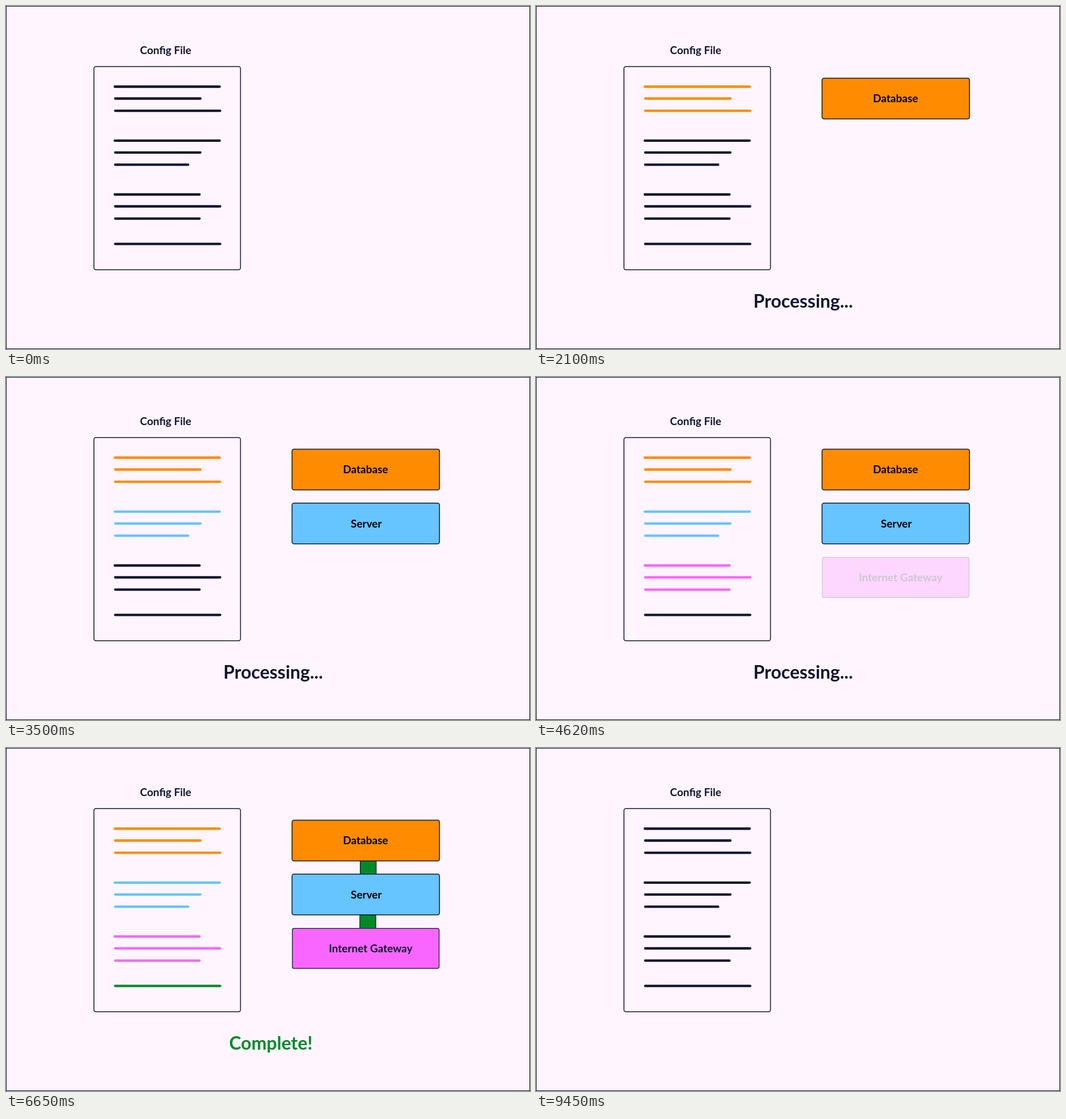
Recreate the animation shown at these times as an HTML page. Size 924 by 606 pixels, loop 9.8 s.

```html
<!DOCTYPE html>
<html lang="en">
<head>
<meta charset="utf-8">
<title>Config file processing</title>
<style>
  html, body { margin: 0; width: 100%; height: 100%; overflow: hidden; background: #fff5ff; }
  svg { display: block; width: 924px; height: 606px; }
  text { font: 700 19px Lato, "Open Sans", sans-serif; text-anchor: middle; fill: #10162f; }
  .status { font-size: 32px; }
  .lines { fill: none; stroke-width: 4.3; stroke-linecap: round; }
  rect { stroke: #10162f; stroke-width: 1.5; }
</style>
</head>
<body>
<svg viewBox="0 0 924 606">
  <rect x=".5" y=".5" width="923" height="605" fill="#fff5ff" style="stroke-width:1"/>
  <text x="281.5" y="85">Config File</text>
  <rect x="155.1" y="106.9" width="258.4" height="359.2" rx="3.5" fill="none"/>

  <path class="lines" data-start="1120" data-color="#ff8c00" d="M191.8 142.5H376.8M192.6 163.5H342.8M192.6 185.1H377.6"/>
  <path class="lines" data-start="2520" data-color="#66c4ff" d="M191.8 237.8H376.8M192.6 258.8H342.8M192.6 280.4H321.2"/>
  <path class="lines" data-start="3920" data-color="#f966ff" d="M191.8 333H341.2M192.6 354H377.6M192.6 375.6H341.2"/>
  <path class="lines" data-start="5670" data-color="#008a27" d="M192.6 420.3H377.6"/>

  <g class="fade" data-start="6020" fill="#008a27">
    <rect x="624.6" y="199.6" width="28.2" height="23" style="stroke-width:1.2"/>
    <rect x="623.9" y="294.8" width="28.2" height="23.8" style="stroke-width:1.2"/>
  </g>
  <g class="fade" data-start="1820">
    <rect x="504.4" y="127.4" width="260" height="72.1" rx="3.5" fill="#ff8c00"/>
    <text x="634" y="170" style="fill:#000">Database</text>
  </g>
  <g class="fade" data-start="3220">
    <rect x="504.4" y="222.7" width="260" height="72.1" rx="3.5" fill="#66c4ff"/>
    <text x="635.3" y="265.7" style="fill:#000">Server</text>
  </g>
  <g class="fade" data-start="4620">
    <rect x="505" y="318.6" width="258.7" height="70.8" rx="3" fill="#f966ff" style="stroke-width:1.3"/>
    <text x="643" y="361">Internet Gateway</text>
  </g>

  <text class="status fade" data-start="420" data-end="6370" x="471" y="533">Processing...</text>
  <text class="status fade" data-start="6370" x="467" y="533" style="fill:#008a27">Complete!</text>
</svg>
<script>
  const LOOP = 9800, STEP = 70, RESET = 9170, INK = '#10162f';
  const lines = document.querySelectorAll('.lines');
  const faders = document.querySelectorAll('.fade');

  // Every transition is linear, in five discrete steps.
  const ramp = (t, start) =>
    Math.min(1, Math.max(0, (Math.floor((t - start) / STEP) + 1) / 5));
  const level = (t, { start, end = RESET }) => ramp(t, +start) - ramp(t, +end);

  function draw(t) {
    for (const el of lines) {
      const amount = level(t, el.dataset) * 100;
      el.style.stroke = `color-mix(in srgb, ${el.dataset.color} ${amount}%, ${INK})`;
    }
    for (const el of faders) el.style.opacity = level(t, el.dataset);
  }

  const origin = performance.now();
  function tick() {
    draw((performance.now() - origin) % LOOP);
    requestAnimationFrame(tick);
  }
  tick();
</script>
</body>
</html>
```
